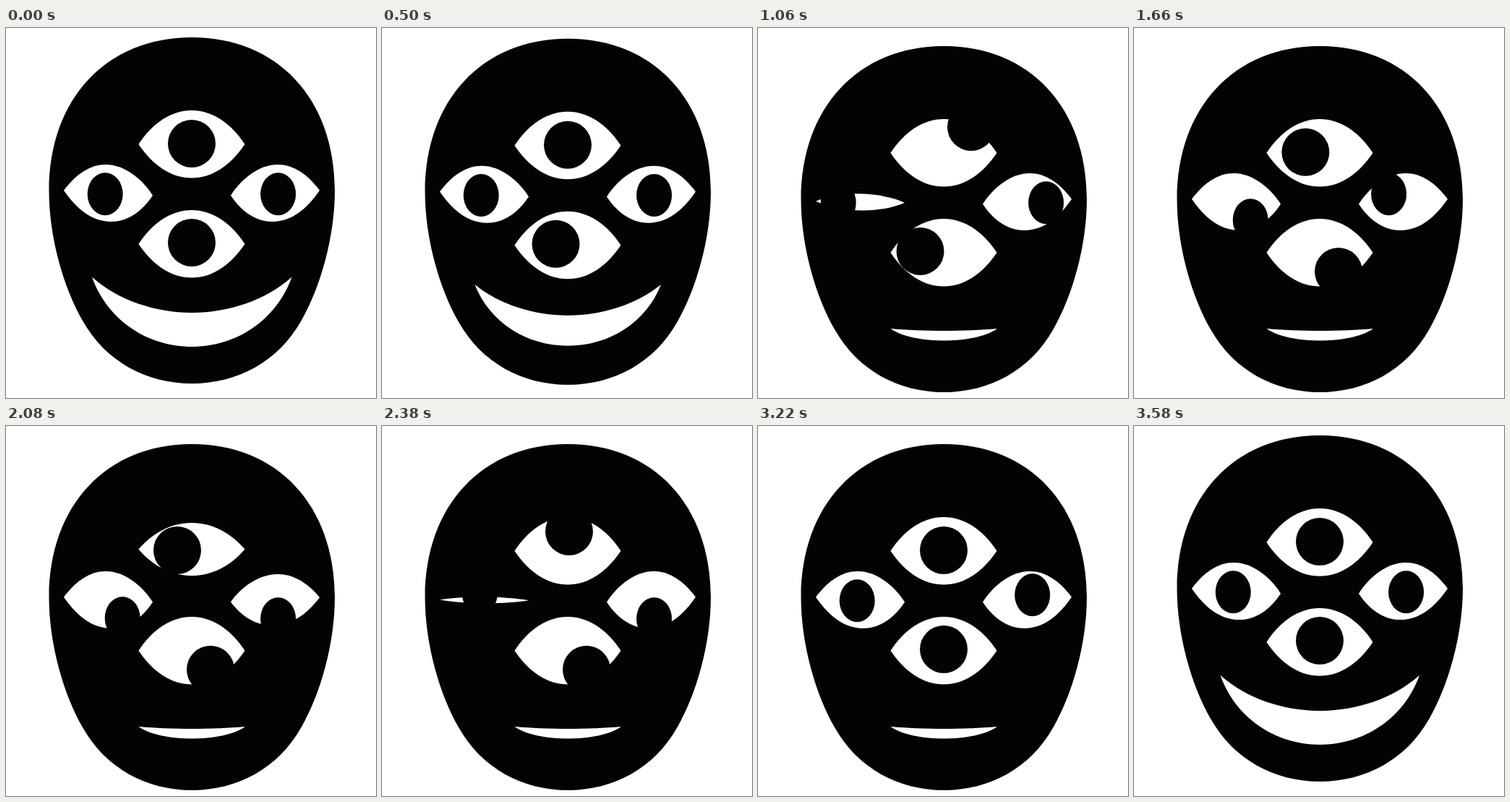
Animation, 512 px wide and 512 px high, one loop 3.62 s. Source, as an HTML page with a canvas:

```html
<!DOCTYPE html>
<html lang="en">
<head>
<meta charset="utf-8">
<title>Four-eyed mask</title>
<style>
html, body { margin: 0; width: 100%; height: 100%; overflow: hidden; background: #fff; }
canvas { display: block; width: 512px; height: 512px; }
</style>
</head>
<body>
<canvas id="stage" width="512" height="512"></canvas>
<script>
const ctx = document.getElementById('stage').getContext('2d');
const LOOP = 3620, BLACK = '#030303', WHITE = '#fff';
const AXIS = 257.25, DROP = 12;
const BLINK = 330, GLANCE = 200;

const head = new Path2D(
  'M257.3 13C139 13 59.5 98 59.5 225C59.5 290 80 360 106 405C138 462 195 492 257.3 492' +
  'C319.6 492 376.6 462 408.6 405C434.6 360 455 290 455 225C455 98 375.6 13 257.3 13Z');
const almond = new Path2D(
  'M-73.5 0C-54 -29.5 -28 -46.8 0 -46.8C28 -46.8 54 -29.5 73.5 0' +
  'C54 29.5 28 46.8 0 46.8C-28 46.8 -54 29.5 -73.5 0Z');
const sideEye = new Path2D(
  'M-57 -4.5C-40 -27.5 -20 -40.3 1 -40.3C26 -40.3 51 -21.5 66 2.5' +
  'C50 26.5 30 38.7 8 38.7C-18 38.7 -40 20.5 -57 -4.5Z');

// hinge: height the lids close towards; moves: [start, dx, dy] of each glance
const eyes = [
  { shape: almond, x: AXIS - 0.3, y: 160.8, hinge: 150.5, pupil: [257, 160], rx: 33, ry: 33,
    blinks: [682, 2030],
    moves: [[850, 38, -35], [1470, -20, 0], [2160, 2, -26], [3000, 0, 0]] },
  { shape: almond, x: AXIS - 0.3, y: 298.8, hinge: 306, pupil: [257, 297], rx: 33, ry: 33,
    blinks: [2606],
    moves: [[400, -32.5, 0], [1400, 26, 28], [2380, 6, 37], [2720, 0, 0]] },
  { shape: sideEye, x: 137, y: 229.3, hinge: 229, pupil: [137.2, 229.7], rx: 24.5, ry: 29.5,
    blinks: [836, 2180],
    moves: [[850, -26, 0], [1260, 24, 24], [2260, -15.5, -28], [2880, 0, 0]] },
  { shape: sideEye, x: 377, y: 229.3, flip: true, hinge: 229, pupil: [376.6, 229.7], rx: 24.5, ry: 29.5,
    blinks: [553, 1785],
    moves: [[658, 22, 0], [1160, -24, -12], [1860, 0, 25], [2440, 9, -23], [3100, 0, 0]] }
];

const progress = (t, start, length) => Math.min(1, Math.max(0, (t - start) / length));
const smooth = x => x * x * (3 - 2 * x);
const mix = (a, b, k) => a + (b - a) * k;

function settle(t) {
  const down = smooth(1 - Math.pow(1 - progress(t, 400, 600), 1.5));
  const up = smooth(progress(t, 3240, 360));
  return down - up;
}

function openness(eye, t) {
  return eye.blinks.reduce((open, start) =>
    open - Math.sin(Math.PI * progress(t, start, BLINK)) ** 2, 1);
}

function gaze(eye, t) {
  let x = 0, y = 0;
  for (const [start, dx, dy] of eye.moves) {
    const k = smooth(progress(t, start, GLANCE));
    x = mix(x, dx, k);
    y = mix(y, dy, k);
  }
  return [x, y];
}

function drawEye(eye, t) {
  ctx.save();
  ctx.translate(eye.x, eye.hinge);
  ctx.scale(eye.flip ? -1 : 1, Math.max(0, openness(eye, t)));
  ctx.translate(0, eye.y - eye.hinge);
  ctx.fillStyle = WHITE;
  ctx.fill(eye.shape);
  ctx.restore();

  const [dx, dy] = gaze(eye, t);
  ctx.fillStyle = BLACK;
  ctx.beginPath();
  ctx.ellipse(eye.pupil[0] + dx, eye.pupil[1] + dy, eye.rx, eye.ry, 0, 0, Math.PI * 2);
  ctx.fill();
}

function drawMouth(calm) {
  const point = (x0, y0, x1, y1) => [AXIS - mix(x0, x1, calm), mix(y0, y1, calm)];
  const mirror = ([x, y]) => [2 * AXIS - x, y];
  const corner = point(138.3, 344.5, 73.8, 416);
  const upper = [point(102, 377, 52, 418), point(50, 394, 27, 419), point(0, 394, 0, 419)];
  const lower = [point(117, 404, 59, 427), point(62, 441, 29, 432.5), point(0, 441, 0, 432.5)];

  ctx.fillStyle = WHITE;
  ctx.beginPath();
  ctx.moveTo(...corner);
  ctx.bezierCurveTo(...upper[0], ...upper[1], ...upper[2]);
  ctx.bezierCurveTo(...mirror(upper[1]), ...mirror(upper[0]), ...mirror(corner));
  ctx.bezierCurveTo(...mirror(lower[0]), ...mirror(lower[1]), ...lower[2]);
  ctx.bezierCurveTo(...lower[1], ...lower[0], ...corner);
  ctx.fill();
}

function draw(t) {
  const calm = settle(t);
  ctx.fillStyle = WHITE;
  ctx.fillRect(0, 0, 512, 512);
  ctx.save();
  ctx.translate(0, DROP * calm);
  ctx.fillStyle = BLACK;
  ctx.fill(head);
  eyes.forEach(eye => drawEye(eye, t));
  ctx.restore();
  drawMouth(calm);
}

const begin = performance.now();
function tick() {
  draw((performance.now() - begin) % LOOP);
  requestAnimationFrame(tick);
}
tick();
</script>
</body>
</html>
```
